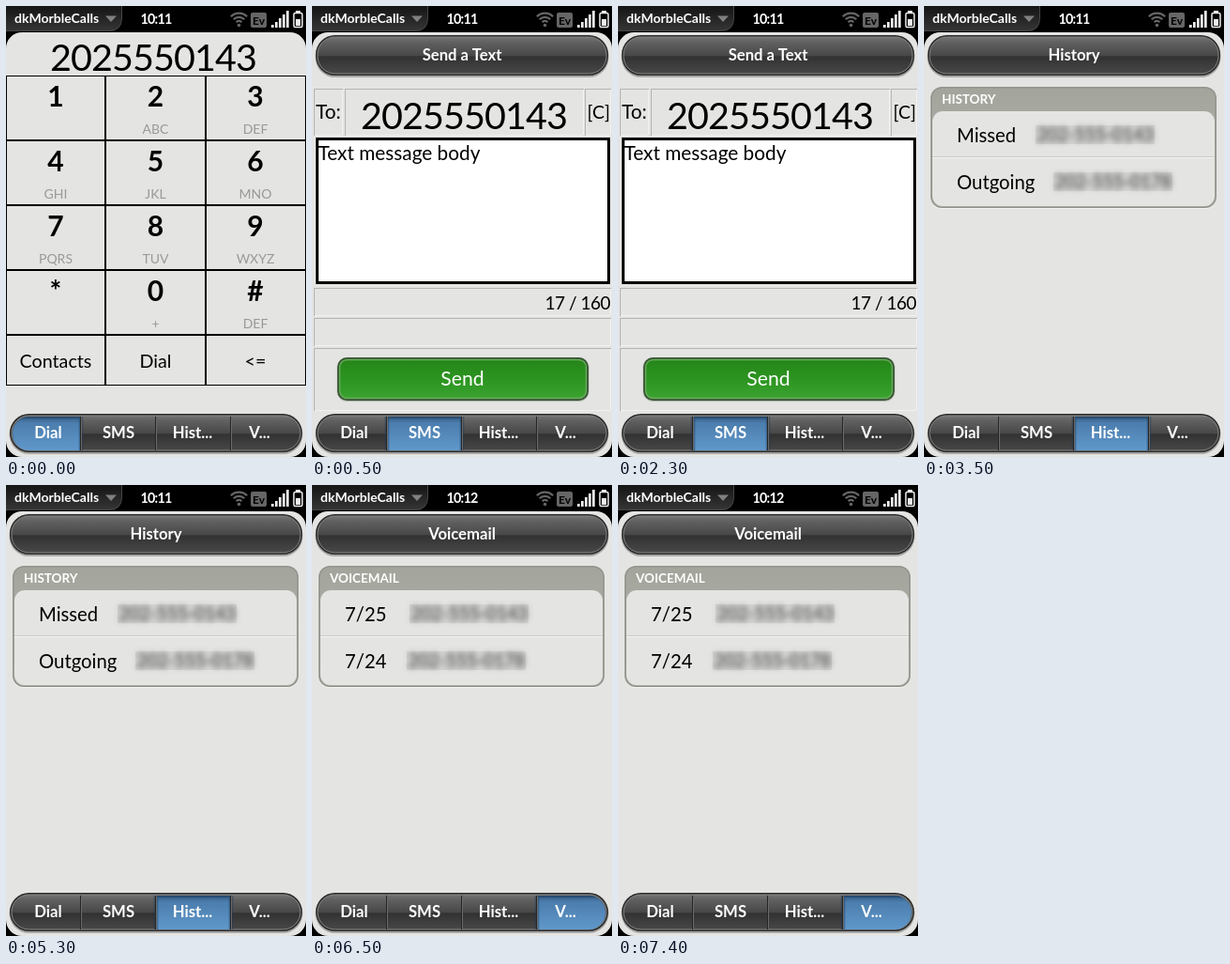
Recreate the animation shown at these times as an HTML page. Size 320 px wide and 480 px high, loop 8000 ms.

```html
<!DOCTYPE html>
<html lang="en">
<head>
<meta charset="utf-8">
<title>Phone dialer</title>
<style>
html, body { margin: 0; width: 100%; height: 100%; overflow: hidden; background: #000; }
svg { display: block; width: 100vw; height: 100vh; }
text { font-family: Lato, "Open Sans", sans-serif; }
</style>
</head>
<body>
<svg id="stage" viewBox="0 0 320 480">
  <defs>
    <linearGradient id="dark" x2="0" y2="1">
      <stop offset="0" stop-color="#747474"/><stop offset=".15" stop-color="#606060"/>
      <stop offset=".5" stop-color="#484848"/><stop offset=".54" stop-color="#323232"/>
      <stop offset="1" stop-color="#484848"/>
    </linearGradient>
    <linearGradient id="blue" x2="0" y2="1">
      <stop offset="0" stop-color="#365d84"/><stop offset=".2" stop-color="#4c7eae"/>
      <stop offset="1" stop-color="#6098cb"/>
    </linearGradient>
    <linearGradient id="green" x2="0" y2="1">
      <stop offset="0" stop-color="#258619"/><stop offset=".5" stop-color="#2c9420"/>
      <stop offset="1" stop-color="#3aa32f"/>
    </linearGradient>
    <linearGradient id="menu" x2="0" y2="1">
      <stop offset="0" stop-color="#151515"/><stop offset="1" stop-color="#363636"/>
    </linearGradient>
    <linearGradient id="group" x2="0" y2="1">
      <stop offset="0" stop-color="#a3a49b"/><stop offset="1" stop-color="#b4b5ac"/>
    </linearGradient>
    <filter id="soft" x="-10%" y="-40%" width="120%" height="180%">
      <feGaussianBlur stdDeviation="3.2"/>
    </filter>
    <clipPath id="barClip"><rect x="7" y="437" width="306" height="36" rx="17.5"/></clipPath>
  </defs>
  <rect width="320" height="480"/>
  <rect y="28" width="320" height="452" rx="17" fill="#e4e4e2"/>
  <g id="status"></g>
  <g id="view"></g>
  <g id="tabs"></g>
</svg>
<script>
const $ = id => document.getElementById(id);
const NUMBER = '2025550143';
const LOOP = 8000;

const rect = (x, y, w, h, fill, more = '') =>
  `<rect x="${x}" y="${y}" width="${w}" height="${h}" fill="${fill}" ${more}/>`;
const text = (s, x, y, size, { fill = '#000', bold = false, at = 'start', more = '' } = {}) =>
  `<text x="${x}" y="${y}" font-size="${size}" fill="${fill}" font-weight="${bold ? 700 : 400}" text-anchor="${at}" ${more}>${s}</text>`;
const white = (s, x, y, size, at = 'middle', more = '') => text(s, x, y, size, { fill: '#fff', bold: true, at, more });
const bigNumber = (x, y) =>
  text(NUMBER, x, y, 39.5, { at: 'middle', more: 'letter-spacing="-.9"' });

// Rounded bar: soft shadow, dark rim, light ring, dark face.
function pill(y, h) {
  return rect(3.5, y + .5, 313, h + 1.5, '#a8a8a6', 'rx="21"') +
    rect(4, y, 312, h, '#2c2c2c', 'rx="20.5"') +
    rect(6, y + 2, 308, h - 4, 'url(#dark)', 'rx="18.5" stroke="#858585"');
}

const header = title => pill(31, 43) + white(title, 160, 58, 16.7);

function status(time) {
  const wifi = [4, 8, 12].map(r => {
    const d = r * .72;
    return `<path d="M${248.5 - d} ${20 - d}A${r} ${r} 0 0 1 ${248.5 + d} ${20 - d}" fill="none" stroke="#666" stroke-width="2.2"/>`;
  }).join('');
  const bars = [3, 6, 10, 14, 18].map((h, i) => rect(283 + i * 4, 23 - h, 2.7, h, '#eee')).join('');
  return `<path d="M0 0H123.500V13Q123.500 27 109 27H0Z" fill="url(#menu)"/>` +
    `<path d="M123.500 0V13Q123.500 26.500 109 26.500H0" fill="none" stroke="#454545"/>` +
    white('dkMorbleCalls', 9, 18, 14, 'start') +
    `<path d="M106 10.500H118L112 17Z" fill="#808080"/>` +
    white(time, 160, 19, 14.3, 'middle', 'letter-spacing="-.8"') +
    wifi + '<circle cx="248.500" cy="20.500" r="1.800" fill="#666"/>' +
    rect(261, 7, 17, 16, '#666', 'rx="2"') +
    text('Ev', 269.5, 19.5, 12, { bold: true, at: 'middle' }) + bars +
    rect(309, 5, 5, 3, '#eee') +
    rect(307, 7.5, 9, 15, '#000', 'rx="1.5" stroke="#eee" stroke-width="1.5"') +
    rect(309, 14, 5, 7, '#eee');
}

function tabs(active) {
  const labels = [['Dial', 45], ['SMS', 120], ['Hist...', 199], ['V...', 270.5]];
  const x = active * 80;
  const inset = [1, 3, 5].map(w => rect(x, 437, 80, 40, 'none', `stroke="#1c3a58" stroke-opacity=".3" stroke-width="${w}"`)).join('');
  return pill(434, 41) +
    `<g clip-path="url(#barClip)">${rect(x, 437, 80, 36, 'url(#blue)')}${inset}</g>` +
    [79, 159, 239].map(d => rect(d, 437, 1, 36, '#262626') + rect(d + 1, 437, 1, 36, '#6a6a6a')).join('') +
    labels.map(([s, mid]) => white(s, mid, 460, 16.7)).join('');
}

function dialView() {
  const keys = [['1', ''], ['2', 'ABC'], ['3', 'DEF'], ['4', 'GHI'], ['5', 'JKL'], ['6', 'MNO'],
    ['7', 'PQRS'], ['8', 'TUV'], ['9', 'WXYZ'], ['*', ''], ['0', '+'], ['#', 'DEF']];
  const mid = [53, 159.5, 266];
  const grid = [74, 142, 211, 280, 349, 403].map((y, i) => rect(0, y, 320, i % 5 ? 2 : 1, '#000')).join('') +
    [[0, 1], [105, 2], [212, 2], [319, 1]].map(([x, w]) => rect(x, 74, w, 330, '#000')).join('');
  const pad = keys.map(([key, sub], i) => {
    const x = mid[i % 3], y = 74 + 69 * Math.floor(i / 3);
    return text(key, x, y + 33, 30, { bold: true, at: 'middle' }) +
      text(sub, x, y + 62, 14, { fill: '#999', at: 'middle' });
  }).join('');
  const actions = ['Contacts', 'Dial', '&lt;='].map((s, i) => text(s, mid[i], 385, 19.7, { at: 'middle' })).join('');
  return bigNumber(157, 69) + grid + pad + actions;
}

function smsView() {
  const cell = (x, y, w, h) => rect(x + .5, y + .5, w - 1, h - 1, 'none', 'stroke="#b4b4b2"') +
    `<path d="M${x + 1} ${y + h - .5}H${x + w - .5}V${y + 1}" fill="none" stroke="#f2f2f0"/>`;
  return header('Send a Text') +
    cell(2, 88, 31, 50) + cell(35, 88, 255, 50) + cell(291, 88, 28, 50) +
    cell(2, 300, 317, 30) + cell(2, 332, 317, 30) + cell(2, 364, 317, 67) +
    text('To:', 4, 120, 20.8) + bigNumber(162, 131) +
    text('[C]', 318, 120, 19.5, { at: 'end' }) +
    rect(5.5, 141.5, 311, 153, '#fff', 'stroke="#000" stroke-width="3"') +
    text('Text message body', 6.5, 164, 20.8) +
    text('17 / 160', 318, 323, 19, { at: 'end', more: 'letter-spacing="-.5"' }) +
    rect(26.5, 374, 269, 47, '#b5b8b3', 'rx="11"') +
    rect(27, 374, 268, 46, '#35562f', 'rx="10.5"') +
    rect(29.5, 376.5, 263, 41, 'url(#green)', 'rx="8" stroke="#69a95f" stroke-width="1.5"') +
    text('Send', 160.5, 404, 21.2, { fill: '#fff', at: 'middle' });
}

function listView(title, rows) {
  const lines = rows.map(([label, x, digits], i) => {
    const y = 127 + i * 50;
    return text(label, 35, y + 18, 20.3) + rect(x, y, 127, 20, '#d4d4d2') +
      `<g filter="url(#soft)">${text(digits, x + 63.5, y + 17, 20, { fill: '#606060', bold: true, at: 'middle', more: 'letter-spacing="-.5"' })}</g>`;
  }).join('');
  return header(title) +
    rect(7, 86, 305, 130, '#f5f5f3', 'rx="12"') +
    rect(7, 86, 305, 129, '#92938c', 'rx="12"') +
    rect(8.5, 87.5, 302, 126, 'url(#group)', 'rx="10.5"') +
    rect(9, 112, 301, 101, '#e4e4e2', 'rx="11"') +
    rect(9, 160, 301, 1, '#cbcbc9') + rect(9, 161, 301, 1, '#f4f4f2') +
    white(title.toUpperCase(), 19, 104, 13.5, 'start') + lines;
}

const historyView = () => listView('History', [['Missed', 119, '202-555-0143'], ['Outgoing', 138, '202-555-0178']]);
const voicemailView = () => listView('Voicemail', [['7/25', 104, '202-555-0143'], ['7/24', 101, '202-555-0178']]);

const scenes = [
  { from: 0, time: '10:11', view: dialView },
  { from: 500, time: '10:11', view: smsView },
  { from: 3500, time: '10:11', view: historyView },
  { from: 6500, time: '10:12', view: voicemailView }
];

let shown = -1;
function draw(ms) {
  const t = ms % LOOP;
  const now = scenes.filter(s => s.from <= t).length - 1;
  if (now !== shown) {
    shown = now;
    $('status').innerHTML = status(scenes[now].time);
    $('view').innerHTML = scenes[now].view();
    $('tabs').innerHTML = tabs(now);
  }
}

const start = performance.now();
function tick() {
  draw(performance.now() - start);
  requestAnimationFrame(tick);
}
tick();
</script>
</body>
</html>
```
